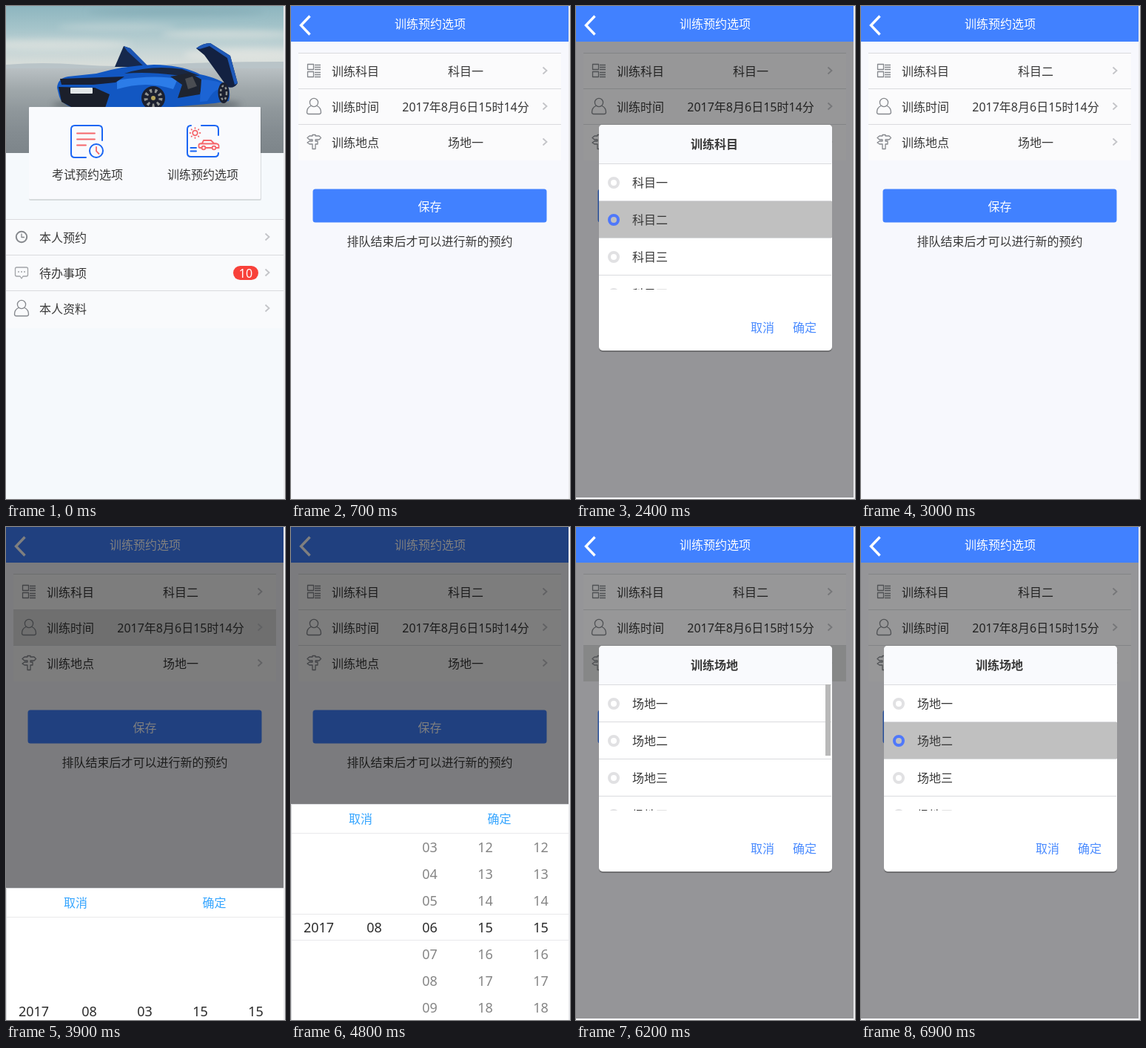
An HTML page that plays this animation: 377 px wide and 664 px high, repeating every 8 s.

```html
<!DOCTYPE html>
<html lang="zh-CN">
<head>
<meta charset="utf-8">
<style>
html, body { margin: 0; width: 100%; height: 100%; overflow: hidden; background: #f7f8fd; }
svg { display: block; width: 377px; height: 664px; }
text { font: 16px "Noto Sans", "Noto Sans CJK SC", "Noto Sans CJK", sans-serif; fill: #383838; }
.mid { text-anchor: middle; }
.white { fill: #fff; }
.title { font-weight: 600; }
.link { fill: #4a8bff; }
.sky { fill: #35a5ff; }
.wheel { font-size: 18px; }
.line { stroke: #dadbde; fill: none; }
.icon { fill: none; stroke: #85888d; stroke-width: 1.3; stroke-linejoin: round; }
.blue { fill: none; stroke: #1b66f3; stroke-width: 2; stroke-linecap: round; }
.red { fill: none; stroke: #f5666b; stroke-width: 1.8; stroke-linecap: round; }
</style>
</head>
<body>
<svg id="stage" viewBox="0 0 377 664"></svg>
<script>
const LOOP = 8000;
const $ = id => document.getElementById(id);

// Text placed by the centre of its line
const text = (x, y, s, cls = '', id = '') =>
  `<text x="${x}" y="${y + 6}" class="${cls}" ${id && `id="${id}"`}>${s}</text>`;
const mid = (x, y, s, cls = '', id = '') => text(x, y, s, 'mid ' + cls, id);
const rect = (x, y, w, h, fill, more = '') =>
  `<rect x="${x}" y="${y}" width="${w}" height="${h}" fill="${fill}" ${more}/>`;
const line = (y, x1, x2) => `<path class="line" d="M${x1} ${y}H${x2}"/>`;
const path = (d, cls) => `<path class="${cls}" d="${d}"/>`;
const shape = (d, fill) => `<path fill="${fill}" d="${d}"/>`;
const circle = (x, y, r, more) => `<circle cx="${x}" cy="${y}" r="${r}" ${more}/>`;
const oval = (x, y, rx, ry, more) => `<ellipse cx="${x}" cy="${y}" rx="${rx}" ry="${ry}" ${more}/>`;
const at = (x, y, s) => `<g transform="translate(${x} ${y})">${s}</g>`;
const arrow = (x, y) =>
  `<path d="M${x} ${y - 4.5}l5 4.5l-5 4.5" fill="none" stroke="#c3c4c8" stroke-width="1.8"/>`;

const icons = {
  clock: circle(0, 0, 7.2, 'class="icon" style="stroke-width:2"') + path('M0 -4.5V.5H4', 'icon'),
  chat: '<g opacity=".75">' +
    path('M-6.5 -7H6.5Q8.5 -7 8.5 -5V3Q8.5 5 6.5 5H2L0 8L-2 5H-6.5Q-8.5 5 -8.5 3V-5Q-8.5 -7 -6.5 -7Z', 'icon') +
    [-4, 0, 4].map(x => circle(x, -1, 1, 'fill="#85888d"')).join('') + '</g>',
  person: circle(0, -5, 5.6, 'class="icon"') +
    path('M-4 -.5Q-9.5 2 -9.5 8Q-9.5 10.5 -7 10.5H7Q9.5 10.5 9.5 8Q9.5 2 4 -.5', 'icon'),
  list: path('M-8.5 -8.5H-.5V-1.500H-8.5ZM-8.5 1.5H-.5V8.5H-8.5ZM1 -7.5H9M1 -4.5H9M1 -1.5H9M1 2.5H9M1 5.5H9M1 8.5H9', 'icon'),
  sign: path('M-2 -9.5H2V-8H7L9.5 -5.5L7 -3H2V-1H5V3H2V9.5H-2V3H-6L-9 1L-6 -1H-2V-3H-6L-9 -5.5L-6 -8H-2Z', 'icon')
};

const clouds = '<g filter="url(#soft)" fill="#e9e9e4">' +
  oval(60, 52, 110, 7, 'opacity=".55"') + oval(300, 38, 90, 6, 'opacity=".5"') +
  oval(150, 28, 80, 4, 'opacity=".35"') + oval(330, 66, 90, 9, 'opacity=".6"') +
  oval(230, 8, 120, 5, 'fill="#7fa5b0" opacity=".5"') + '</g>';

const car =
  oval(190, 133, 128, 8, 'fill="#4f575d" opacity=".7" filter="url(#soft)"') +
  shape('M147 82L159 54L168 57L192 82Z', '#16284c') +
  shape('M159 54L168 57L192 81L187 82L164 61Z', '#1c55b4') +
  shape('M69 110Q70 97 84 95L122 91Q160 80 200 79Q240 80 262 92Q290 98 300 108Q304 118 301 128L282 131L215 137H90Q74 131 72 122Z', '#1257c2') +
  shape('M150 100Q200 92 232 98L226 112Q190 100 150 112Z', '#2c7ce8') +
  shape('M160 91Q195 79 238 85L262 94L228 93Q190 88 160 91Z', '#1a2740') +
  shape('M73 98L160 95L148 103L118 106L75 106Z', '#182035') +
  shape('M71 109L120 110L140 119L134 137H90L75 129Z', '#1b1f2b') +
  rect(87, 110, 30, 8, '#e3e7ea', 'rx="1"') +
  shape('M222 95L248 90L266 100L262 119L232 124L238 106Z', '#1e2430') +
  shape('M242 98L252 95L258 108L246 112Z', '#4a4d52') +
  shape('M264 99Q286 99 300 109L301 118Q286 102 272 128L262 129Z', '#1c64d4') +
  shape('M257 57Q266 50 276 50L303 67L313 104Q308 112 299 109L284 88L268 66Z', '#132141') +
  shape('M257 57Q266 50 276 50L303 67L313 104L309 106L299 70L275 54L262 58Z', '#1f59b8') +
  circle(199, 124, 16, 'fill="#1b2030"') +
  circle(199, 124, 10, 'fill="none" stroke="#8f9290" stroke-width="5" stroke-dasharray="3 4"') +
  circle(199, 124, 3, 'fill="#b4a35a"') +
  oval(294, 117, 7.5, 14, 'fill="#1b2030"') +
  oval(294, 117, 4, 9.5, 'fill="none" stroke="#8f9290" stroke-width="2.5" stroke-dasharray="3 3"');

const rays = [...Array(8)].map((_, i) =>
  `<path class="red" d="M0 -6.3V-6.9" transform="rotate(${i * 45})"/>`).join('');

const bookIcon =
  path('M108 204H93Q88 204 88 199V166Q88 161 93 161H125Q130 161 130 166V181', 'blue') +
  path('M96 171.5H120M96 179.5H120M96 187.5H108', 'red') +
  circle(122, 195, 9, 'class="blue"') + path('M122 190V195.5L125.5 199', 'red');
const trainIcon =
  path('M264 161H282Q287 161 287 166V174M245 181V166Q245 161 250 161M245 181V198Q245 203 250 203H282Q287 203 287 198M249.5 191H257M249.5 195.5H257', 'blue') +
  at(255.5, 171, circle(0, 0, 3.3, 'class="red"') + rays) +
  path('M264 191H262Q260.500 191 260.500 189V187Q261 185 265 185L267 181H277L281 185Q287 185 287.500 188V191H284M270 191H278M263 185.500H283', 'red') +
  circle(267, 191, 2.4, 'class="red"') + circle(281, 191, 2.4, 'class="red"');

const homeRow = (i, icon, s) =>
  line(287.5 + 48 * i, 0, 375) + at(21, 311 + 48 * i, icons[icon]) +
  text(45, 312 + 48 * i, s) + arrow(350.5, 311 + 48 * i);

const home = rect(0, 0, 377, 664, '#f5f9fc') +
  rect(0, 0, 375, 90, 'url(#sky)') + clouds +
  shape('M0 79Q50 75 100 79T210 79T375 75V90H0Z', '#b9c4c8') +
  rect(0, 84, 375, 114, 'url(#ground)') + car +
  rect(31, 137, 314, 125, '#000', 'opacity=".12" rx="2"') +
  rect(31, 136, 313, 124, '#f9fafd', 'rx="1"') +
  bookIcon + trainIcon + mid(110, 227, '考试预约选项') + mid(266, 227, '训练预约选项') +
  rect(0, 288, 375, 146, '#f9fafc') +
  homeRow(0, 'clock', '本人预约') + homeRow(1, 'chat', '待办事项') + homeRow(2, 'person', '本人资料') +
  rect(307, 350, 34, 19, '#f8413a', 'rx="9.5"') + mid(324, 359.5, '10', 'white');

const formRow = (i, icon, s, id) => {
  const y = 88 + 48 * i;
  return rect(10, y - 24, 355, 48, '', `id="row${i}"`) + line(y - 24.5, 10, 365) +
    at(31, y - 1, icons[icon]) + text(55, y, s) + mid(236, y, '', '', id) + arrow(340.5, y - 1);
};
const form = rect(0, 0, 377, 664, '#f7f8fd') + rect(0, 0, 375, 48, '#4181ff') +
  '<path d="M25.500 13.500L13.500 26L25.500 38.500" fill="none" stroke="#fff" stroke-width="3.4"/>' +
  mid(188, 23.5, '训练预约选项', 'white') +
  formRow(0, 'list', '训练科目', 'subject') + formRow(1, 'person', '训练时间', 'time') +
  formRow(2, 'sign', '训练地点', 'place') +
  rect(29.5, 246.5, 316, 45, '#4181ff', 'rx="3.5"') + mid(187.5, 270, '保存', 'white') +
  mid(187.5, 317, '排队结束后才可以进行新的预约');

const option = i => circle(51, 238 + 50 * i, 6, `id="radio${i}" fill="#fff" stroke-width="4"`) +
  text(76, 238 + 50 * i, '', '', 'option' + i) + line(262.5 + 50 * i, 31, 345);
const dialog = rect(0, 48, 375, 614, '#000', 'opacity=".4"') +
  rect(31, 161, 315, 305, '#000', 'rx="5" opacity=".25"') +
  rect(31, 160, 315, 304, '#fff', 'rx="5"') +
  shape('M31 212V165Q31 160 36 160H341Q346 160 346 165V212Z', '#f9fafd') +
  mid(187, 186, '', 'title', 'heading') +
  '<g clip-path="url(#options)">' + rect(31, 263, 315, 49, '#c0c0c0', 'id="chosen"') +
  [0, 1, 2, 3].map(option).join('') + '</g>' + line(212.5, 31, 345) +
  rect(337, 212, 7, 96, '#b9b9b9', 'id="bar"') +
  mid(252, 433, '取消', 'link') + mid(309, 433, '确定', 'link');

// Wheel columns: centre, first and last value
const wheels = [[37.5, 2017, 2017], [112.5, 8, 8], [187.5, 3, 12], [262.5, 12, 21], [337.5, 12, 21]];
const items = ([x, a, b]) => {
  let s = '';
  for (let n = a; n <= b; n++) s += mid(x, 0, String(n).padStart(2, '0'), 'wheel');
  return `<g>${s}</g>`;
};
const picker = rect(0, 0, 375, 664, '#000', 'opacity=".5"') + '<g id="sheet">' +
  rect(0, 0, 375, 300, '#fff') + path('M.5 300V.5H375', 'line') +
  '<g id="wheels" clip-path="url(#wheelArea)">' + wheels.map(items).join('') + '</g>' +
  `<g opacity=".6">${line(39.5, 1, 375)}<g id="marks">${line(148.5, 1, 375)}${line(183.5, 1, 375)}</g></g>` +
  mid(94, 20, '取消', 'sky') + mid(281.5, 20, '确定', 'sky') + '</g>';

const gradient = (id, ...stops) => `<linearGradient id="${id}" x2="0" y2="1">` +
  stops.map((c, i) => `<stop offset="${i / (stops.length - 1)}" stop-color="${c}"/>`).join('') + '</linearGradient>';

$('stage').innerHTML = '<defs>' +
  gradient('sky', '#8db5bf', '#a5c4ca', '#c6d5d6', '#e2e2dc') +
  gradient('ground', '#b9c0c3', '#a0a8ab', '#8f979b', '#848c91', '#7d858a') +
  '<filter id="soft" x="-20%" y="-100%" width="140%" height="300%"><feGaussianBlur stdDeviation="4"/></filter>' +
  `<clipPath id="options">${rect(31, 212, 315, 170)}</clipPath>` +
  `<clipPath id="wheelArea">${rect(0, 40, 375, 260)}</clipPath></defs>` +
  `<g id="home">${home}</g><g id="form">${form}</g><g id="dialog">${dialog}</g><g id="picker">${picker}</g>` +
  rect(375, 0, 2, 664, '#f9f9fc') + path('M376 0V664', 'line');

const show = (id, on) => $(id).style.display = on ? '' : 'none';
const clamp = v => Math.min(1, Math.max(0, v));
const easeOut = (p, n) => 1 - (1 - clamp(p)) ** n;

function drawDialog(t) {
  const places = t >= 6200;
  const picked = places ? t >= 6900 : t >= 2400;
  $('heading').textContent = places ? '训练场地' : '训练科目';
  [...'一二三四'].forEach((n, i) => {
    $('option' + i).textContent = (places ? '场地' : '科目') + n;
    $('radio' + i).setAttribute('stroke', picked && i === 1 ? '#4f78fa' : '#e1e1e3');
  });
  $('radio1').setAttribute('fill', picked ? '#c0c0c0' : '#fff');
  show('chosen', picked);
  $('bar').style.opacity = 1 - clamp((t - (places ? 6600 : 1900)) / 300);
}

function drawPicker(t) {
  const shut = t < 5400 ? 1 - easeOut((t - 3800) / 300, 2.33) : easeOut((t - 5300) / 300, 1.36);
  $('sheet').setAttribute('transform', `translate(0 ${Math.round(373 + 291 * shut)})`);
  show('marks', shut === 0);
  const day = 3 + 3 * easeOut((t - 4300) / 500, 1.6);
  const selected = [2017, 8, day, 15, 15];
  [...$('wheels').children].forEach((g, col) => [...g.children].forEach((el, i) => {
    const n = wheels[col][1] + i, d = n - selected[col];
    el.setAttribute('y', 172.5 + 36 * d);
    el.style.fill = Math.abs(d) < .5 ? '#2b2b2b' : '#858585';
    // Earlier hours and minutes open up once a later day is chosen
    el.style.display = col > 2 && d < 0 && t < 4700 ? 'none' : '';
  }));
}

function draw(t) {
  const within = (a, b) => t >= a && t < b;
  show('home', t < 700);
  show('form', t >= 700);
  const dialogOpen = within(1600, 3000) || t >= 6200;
  const pickerOpen = within(3900, 5600);
  show('dialog', dialogOpen);
  show('picker', pickerOpen);
  $('subject').textContent = t < 3000 ? '科目一' : '科目二';
  $('time').textContent = `2017年8月6日15时${t < 5400 ? 14 : 15}分`;
  $('place').textContent = '场地一';
  [1600, 3900, 6200].forEach((tap, i) =>
    $('row' + i).setAttribute('fill', within(tap, tap + 100) ? '#dfe0e0' : '#fbfbfc'));
  if (dialogOpen) drawDialog(t);
  if (pickerOpen) drawPicker(t);
}

function tick() {
  draw(Math.floor(performance.now() % LOOP / 100) * 100);
  requestAnimationFrame(tick);
}
tick();
</script>
</body>
</html>
```
